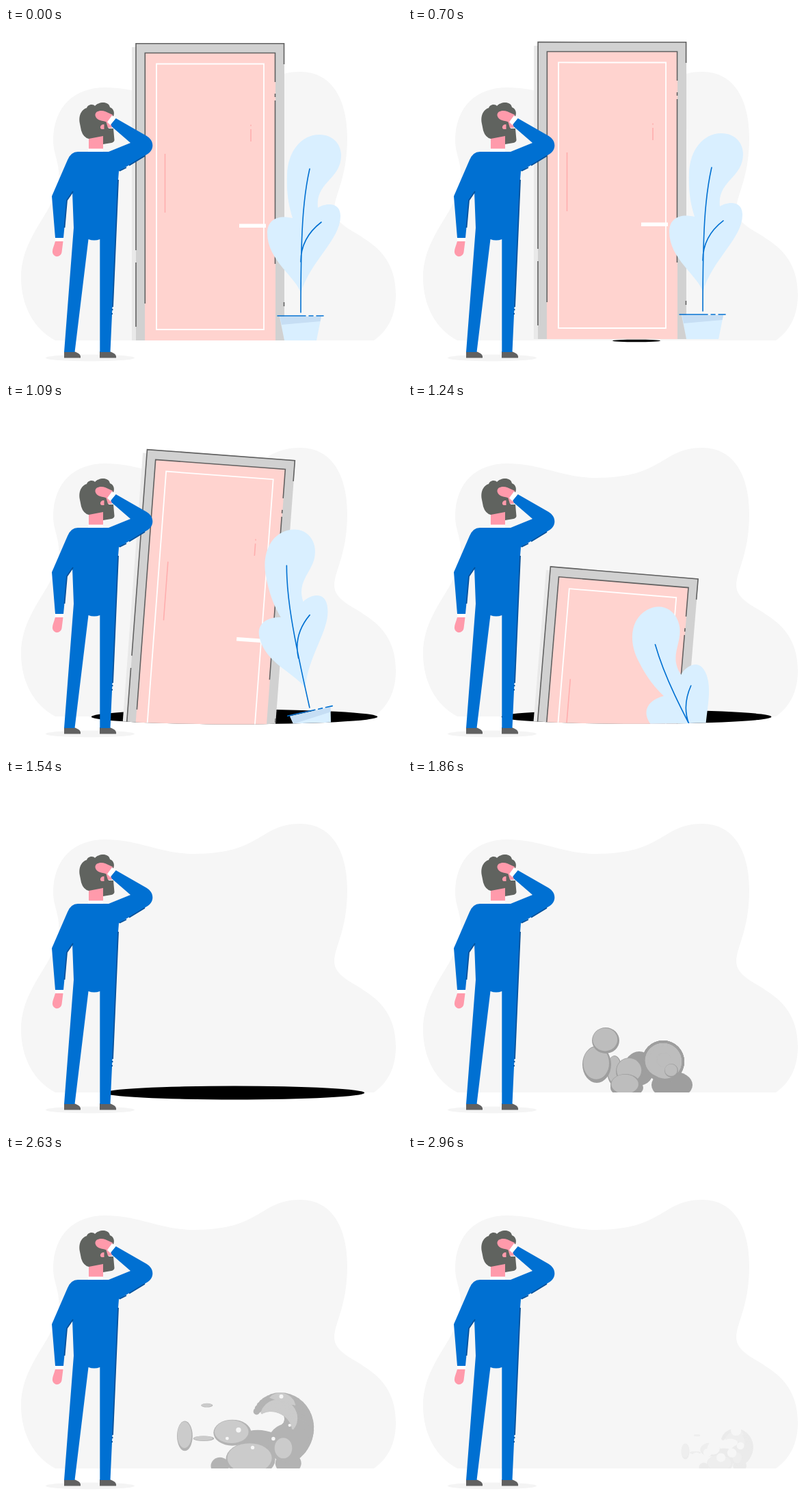
An HTML page with a canvas for the animation above (3020 ms loop, 579 by 509 pixels).

```html
<!DOCTYPE html>
<html lang="en">
<head>
<meta charset="utf-8">
<title>Vanishing door</title>
<style>
  html, body { margin: 0; width: 100%; height: 100%; overflow: hidden; background: #fff; }
  svg, canvas { position: absolute; left: 0; top: 0; width: 579px; height: 509px; }
  .line { fill: none; stroke: #616161; stroke-width: 1.6; }
  .white { fill: none; stroke: #fff; stroke-width: 1.8; }
  .rose { fill: none; stroke: #ffaeae; stroke-width: 1.6; }
  .vein { fill: none; stroke: #0070d2; stroke-width: 1.6; stroke-linecap: round; }
  .fold { fill: none; stroke: #01509b; stroke-width: 1.8; }
  .skin { fill: #ff9aab; }
  .hair { fill: #60635f; }
  .leaf { fill: #d9efff; }
</style>
</head>
<body>
<svg viewBox="0 0 579 509">
  <defs><clipPath id="floor"><path id="floorPath"/></clipPath></defs>

  <path fill="#f6f6f6" d="M72 457C40 440 22 405 22 365C22 305 70 270 77 226C80 200 69 185 69 165C69 115 100 87 145 87C195 87 225 108 275 108C375 108 370 64 430 64C480 64 499 110 499 160C499 220 480 245 480 265C480 305 570 300 570 390C570 425 555 445 538 457Z"/>
  <ellipse id="hole" cx="334" cy="457.5"/>

  <g id="scene" clip-path="url(#floor)">
    <g id="door">
      <path fill="#e9e9e9" d="M184 28H190V457H184Z"/>
      <path fill="#d1d1d1" d="M190 22H407V457H190Z"/>
      <path fill="#ffd3cf" d="M203 36H394V457H203Z"/>
      <path class="line" d="M190 325V22.7H406.5V53M190 343V437M406.5 401V407M203.3 403V36.5H393.5V79M393.5 96V101M393.5 106V345"/>
      <path class="white" d="M220 52.5H377V441H220Z"/>
      <path class="rose" d="M232.5 184V270M358 148V166M358 141.5V143.5"/>
      <path fill="#fff" d="M341 286.5H380V292H341Z"/>
    </g>
    <g id="plant">
      <path class="leaf" d="M400 422H461L454 457H407Z"/>
      <path fill="#c6def4" d="M400.5 422H461L459.5 429L403 434Z"/>
      <path class="vein" d="M397 421H438M443 421H449M454 421H464"/>
      <path class="leaf" d="M431 388C425 365 382 340 382 300C382 280 398 273 419 278C414 262 410 245 411 215C412 180 432 156 458 156C480 156 490 172 490 186C490 222 452 225 456 263C464 257 489 252 489 275C489 310 445 340 431 388Z"/>
      <path class="vein" d="M444 206C434 250 431 300 431 416M461 284C440 300 431 320 431 342"/>
    </g>
  </g>

  <g id="man">
    <ellipse cx="123" cy="482.5" rx="65" ry="5" fill="#f4f4f4"/>
    <path fill="#616161" d="M85 473H99C106 475 110 478 109 482.5H85ZM137 473H151C158 475 162 478 161 482.5H137Z"/>
    <path class="skin" d="M121 155H142V177H121ZM72 312H83.5L81.5 328C80 335 72 336 69 331C66 326 70 320 72 312Z"/>
    <path fill="#fff" d="M120 176.5H142V181.5H120ZM71.5 306H84.5L84 312H72Z"/>
    <path fill="#0070d2" d="M105 181H150L182 168L152 142L160.500 132L205 157.500C217 164 217 178 207.500 184L165 209.500L164 222L152.500 474H137.300V309Q129 312 120.500 309L100.500 474H85L99 292L97 240L89 253L84 307H72L67 246L90 193Q95 181 105 181Z"/>
    <path class="fold" d="M203 187L180 201M176 204L166 209M164 222L156 408M155.5 411V413M155 417V419M98 239L89 252L85.5 292"/>
    <path class="hair" d="M108 140C105 124 114 118 118 117C120 111 128 111 130 114C135 108 150 106 152 116C158 118 159 125 157 129L147 134L150 147L157 147L158.5 164Q158 167 154 168L142 170V158L121 162Q113 160 110 150Z"/>
    <path class="skin" d="M146 136L152 136L155 146H149ZM143.5 141C138 140 136 147 140 148H143.5Z"/>
    <path class="skin" d="M130.5 128C130 121 139 120 145 122L156 127C157 130 152 137 148 138C142 135 132 136 130.5 128Z"/>
    <path fill="#fff" d="M155 128L161 131.5L152.5 142L148 137.5Z"/>
  </g>
</svg>
<canvas id="smoke" width="579" height="509"></canvas>

<script>
const LOOP = 3020, GROUND = 457, DARK = '#9e9e9e', LIGHT = '#bdbdbd';
const el = id => document.getElementById(id);
const mix = (a, b, k) => a + (b - a) * k;
const span = (t, a, b) => Math.min(1, Math.max(0, (t - a) / (b - a)));
const smooth = k => k * k * (3 - 2 * k);
const backOut = k => 1 + 3 * (k - 1) ** 3 + 2 * (k - 1) ** 2;

// The picture holds between steps: 30 ms each, 70 ms while the smoke boils.
function held(t) {
  if (t < 700) return 0;
  const [from, step] = t < 1720 ? [700, 30] : t < 2840 ? [1720, 70] : [2840, 30];
  return from + Math.floor((t - from) / step) * step;
}

const ctx = el('smoke').getContext('2d');

function oval(x, y, rx, ry, fill) {
  ctx.fillStyle = fill;
  ctx.beginPath();
  ctx.ellipse(x, y, rx, ry, 0, 0, 7);
  ctx.fill();
}

// A puff grows from one oval (x, y, rx, ry) into another.
function puff(k, young, full, lit = true) {
  const [x, y, rx, ry] = young.map((v, i) => mix(v, full[i], k));
  oval(x, y, rx, ry, DARK);
  if (lit) oval(x - rx * 0.04, y - ry * 0.07, rx * 0.9, ry * 0.88, LIGHT);
}

// A round cloud that unrolls into an arc, with its width given along the arc.
function curl(k, fill, young, radius, from, to, width) {
  for (let i = 0; i <= 24; i++) {
    const u = i / 24, a = mix(from, to, u) * Math.PI / 180;
    const R = mix(3, radius, k), r = mix(young, width(u), k);
    oval(mix(373, 386, k) + R * Math.cos(a), mix(412, 388, k) + R * Math.sin(a), r, r, fill);
  }
}

// Round holes eat the cloud as it thins out.
function erode(k) {
  let seed = 11;
  const random = () => (seed = seed * 16807 % 2147483647) / 2147483647;
  ctx.globalCompositeOperation = 'destination-out';
  for (let i = 0; i < 10; i++) {
    const r = mix(10, 26, random()) * k;
    oval(mix(235, 435, random()), mix(345, GROUND, random()), r, r, '#000');
  }
}

function drawSmoke(t) {
  ctx.clearRect(0, 0, 579, 509);
  if (t < 1720) return;
  const k = span(t, 1860, 2350), late = span(t, 2350, 2960), drift = late ** 3;
  const size = mix(0.35, 1, span(t, 1720, 1860)) * mix(1, 0.5, drift);
  ctx.save();
  ctx.beginPath();
  ctx.rect(0, 0, 579, GROUND);
  ctx.clip();
  ctx.translate(345 + 110 * drift, GROUND);
  ctx.scale(size, size);
  ctx.translate(-345, -GROUND);

  puff(k, [338, 422, 22, 25], [358, 413, 32, 15], false);
  puff(k, [386, 446, 30, 20], [405, 449, 20, 16], false);
  curl(k, DARK, 28, 35, 212, 420, u => 5 + 25 * u);
  curl(k, LIGHT, 24, 27, 218, 375, u => 2 + 9 * Math.sin(Math.PI * u));
  curl(k, LIGHT, 10, 41, 255, 318, u => 7 * Math.sin(Math.PI * u));
  puff(k, [302, 425, 11, 22], [275, 411, 16, 4]);
  puff(k, [276, 416, 21, 27], [246, 407, 12, 23]);
  puff(k, [289, 381, 20, 19], [280, 360, 9, 3]);
  puff(k, [324, 426, 20, 20], [319, 402, 29, 20]);
  puff(k, [320, 450, 24, 14], [300, 453, 14, 13], false);
  puff(k, [318, 446, 22, 16], [347, 443, 38, 26]);
  puff(k, [385, 425, 10, 10], [398, 427, 15, 18]);
  erode(late ** 2);

  ctx.restore();
  el('smoke').style.opacity = 1 - 0.88 * span(t, 2500, 2960);
}

function drawHole(t) {
  const open = t < 700 ? 0 : t < 1210 ? backOut(span(t, 680, 1210)) : backOut(1 - span(t, 1210, 1690));
  const rx = Math.max(0, 196 * open), ry = rx * 0.052;
  el('hole').setAttribute('rx', rx);
  el('hole').setAttribute('ry', ry);
  el('floorPath').setAttribute('d',
    `M0 -100H579V457.5H${334 + rx}A${rx} ${ry} 0 0 1 ${334 - rx} 457.5H0Z`);
}

function place(id, cx, cy, x, y, angle) {
  el(id).setAttribute('transform', `translate(${x} ${y}) rotate(${angle} ${cx} ${cy})`);
}

// Both things hop, lean towards each other, then drop.
function drawFall(t) {
  el('scene').style.display = t < 1420 ? '' : 'none';
  const tilt = smooth(span(t, 690, 910));
  const hop = -13 * Math.sin(Math.PI * span(t, 690, 890));
  const fall = Math.max(0, (t - 914) / 326);
  place('door', 298.5, 239.5, 0, hop + 4.5 * tilt + 219 * fall ** 2.5, 3.7 * tilt + 1.06 * fall);
  place('plant', 437.5, 311, -31.5 * fall ** 1.8, hop + 136 * fall ** 2.5, -4.9 * tilt - 23.7 * fall ** 1.8);
}

const start = performance.now();
function frame() {
  const t = held((performance.now() - start) % LOOP);
  drawHole(t);
  drawFall(t);
  drawSmoke(t);
  requestAnimationFrame(frame);
}
frame();
</script>
</body>
</html>
```
